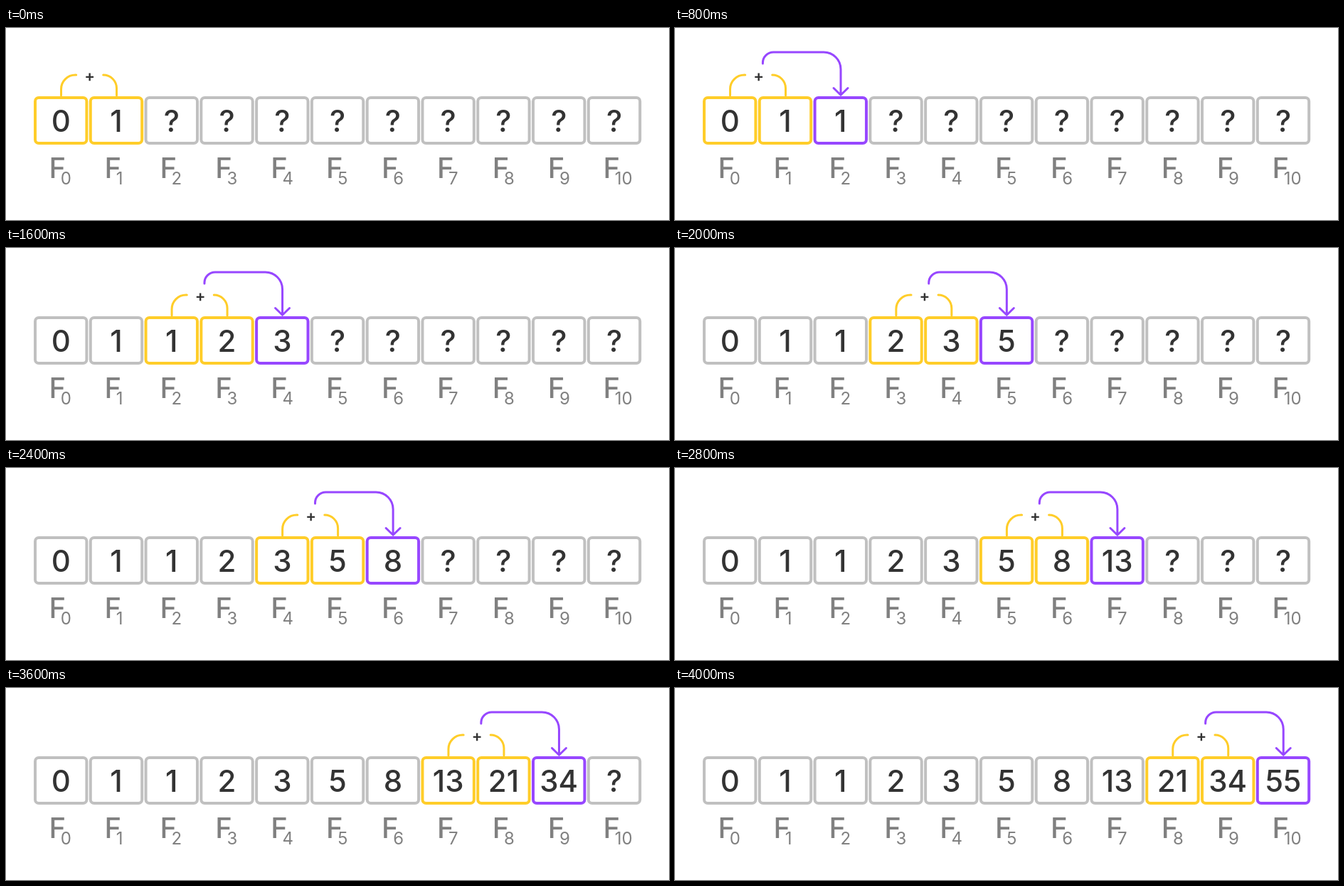
Animation, 932 px wide and 270 px high, one loop 4400 ms. Source, as an HTML page with a canvas:

```html
<!DOCTYPE html>
<html lang="en">
<head>
<meta charset="utf-8">
<title>Fibonacci sequence</title>
<style>
  html, body { margin: 0; width: 100%; height: 100%; overflow: hidden; background: #fff; }
  canvas { display: block; width: 932px; height: 270px; }
</style>
</head>
<body>
<canvas id="stage" width="932" height="270"></canvas>
<script>
const ctx = document.getElementById('stage').getContext('2d');
const STEP = 400, PHASES = 11, COUNT = 11;
const FIRST = 77.2, PITCH = 77.78;
const GRAY = '#c0c0c0', YELLOW = '#ffcd29', PURPLE = '#9747ff';
const INK = '#333', LABEL = '#808080';

const fib = [0, 1];
while (fib.length < COUNT) fib.push(fib.at(-1) + fib.at(-2));

const center = i => FIRST + i * PITCH;

function text(str, x, y, size, weight, color, align = 'center') {
  ctx.font = `${weight} ${size}px Inter, sans-serif`;
  ctx.fillStyle = color;
  ctx.textAlign = align;
  ctx.fillText(str, x, y);
}

function stroke(path, color, width) {
  ctx.strokeStyle = color;
  ctx.lineWidth = width;
  ctx.stroke(path);
}

function cell(i, value, color) {
  const x = center(i);
  const box = new Path2D();
  box.roundRect(x - 36.2, 98, 72.4, 64, 5);
  stroke(box, color, 4);
  text(value, x, 145.5, 42, 500, INK);

  const left = 60.6 + i * 77.9;
  text('F', left, 211, 40, 500, LABEL, 'left');
  text(i, left + 16.2, 219.7, 24, 400, LABEL, 'left');
}

// Bracket joining the two terms being added
function bracket(i) {
  ctx.save();
  ctx.translate(center(i), 0);
  stroke(new Path2D('M.3 95V86A20 20 0 0 1 20.3 66H21.5M59.5 66A18.8 18.8 0 0 1 78.3 84.8V95'), YELLOW, 3);
  text('+', 40.4, 74.6, 22, 600, INK);
  ctx.restore();
}

// Arrow from the sum to the next term
function arrow(i) {
  ctx.save();
  ctx.translate(center(i), 0);
  stroke(new Path2D('M46.2 50V49A15 15 0 0 1 61.2 34H131.8A24 24 0 0 1 155.8 58V94M145.8 84.5L155.8 94.3L165.8 84.5'), PURPLE, 3);
  ctx.restore();
}

function draw(phase) {
  // The first sum takes three phases; each later one takes a single phase.
  const start = Math.max(0, phase - 2);
  const target = start + 2;
  const known = phase < 2 ? 1 : target;

  ctx.fillStyle = '#fff';
  ctx.fillRect(0, 0, 932, 270);
  ctx.lineCap = ctx.lineJoin = 'round';

  bracket(start);
  for (let i = 0; i < COUNT; i++) {
    let color = GRAY;
    if (i === start || i === start + 1) color = YELLOW;
    else if (i === target && phase > 0) color = PURPLE;
    cell(i, i <= known ? fib[i] : '?', color);
  }
  if (phase > 0) arrow(start);
}

const began = performance.now();
function tick() {
  const elapsed = performance.now() - began;
  draw(Math.floor(elapsed / STEP) % PHASES);
  requestAnimationFrame(tick);
}
tick();
</script>
</body>
</html>
```
